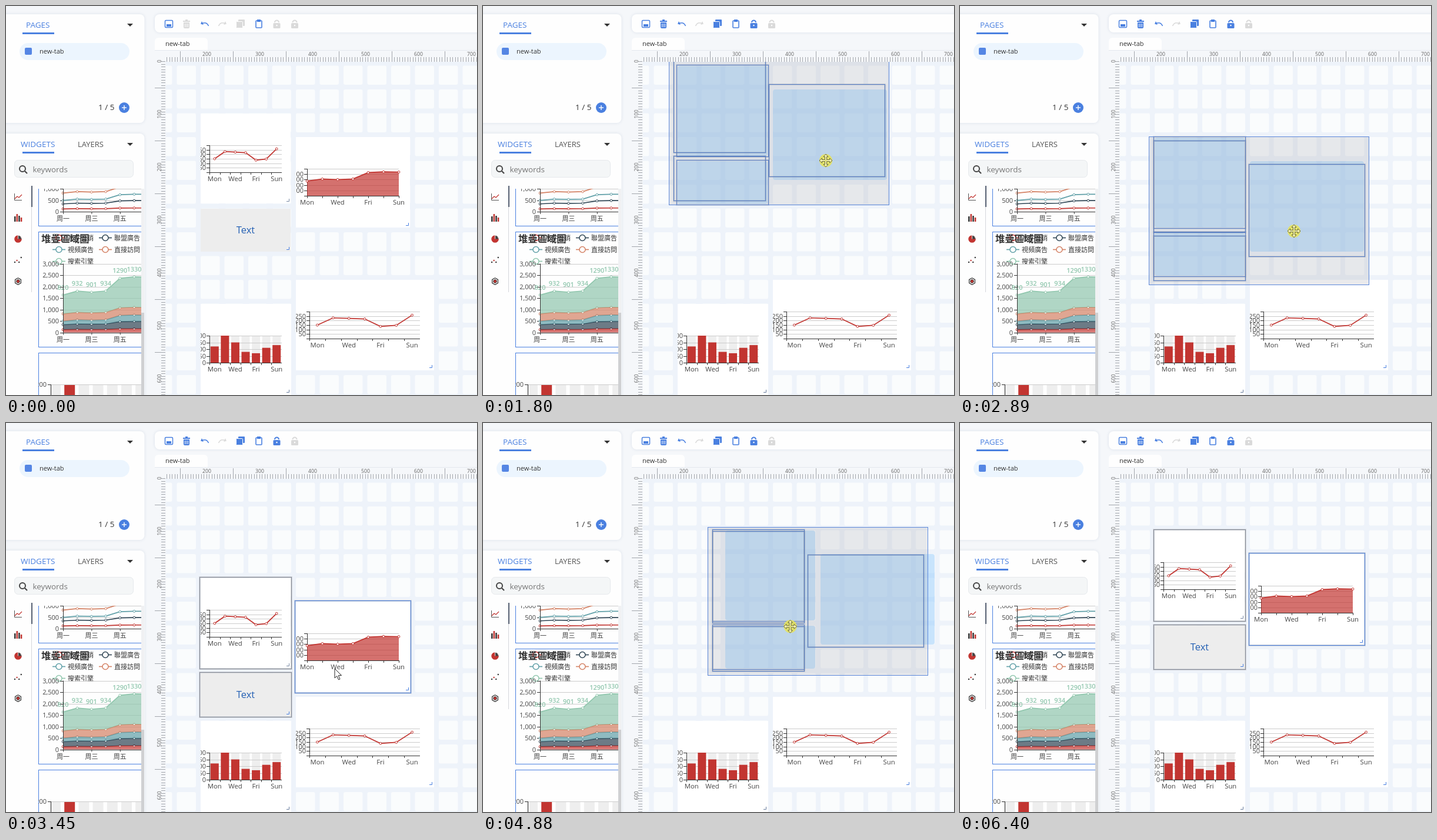
These frames come from a looping animation (801x662 px, 6860 ms). An HTML page with a canvas:

```html
<!DOCTYPE html>
<html lang="zh-Hant">
<head>
<meta charset="utf-8">
<title>Dashboard editor</title>
<style>
html, body { margin: 0; width: 100%; height: 100%; overflow: hidden; background: #f5f7fa; }
canvas { display: block; }
</style>
</head>
<body>
<canvas id="stage" width="801" height="662"></canvas>
<script>
const c = document.getElementById('stage').getContext('2d');
const LOOP = 6860, CELL = 40.5;
const BLUE = '#4a80e0', OFF = '#dadada', INK = '#333', RED = '#c23531', PAGE = '#f5f7fa';
const FONT = '"Open Sans","Noto Sans CJK TC","Noto Sans CJK SC","Noto Sans CJK JP",sans-serif';
const PALETTE = [RED, '#2f4554', '#61a0a8', '#d48265', '#91c7ae'];
const DAYS = ['Mon', 'Tue', 'Wed', 'Thu', 'Fri', 'Sat', 'Sun'];
const LINE = [150, 230, 224, 218, 135, 147, 260];
const BARS = [120, 200, 150, 80, 70, 110, 130];
const AREA = [820, 932, 901, 934, 1290, 1330, 1320];
// Stacked series follow the area data, each from its own level with its own gain
const SERIES = [[120, .08], [220, .2], [150, .25], [320, .03], [820, 1]]
  .map(([level, gain]) => AREA.map(v => level + (v - 820) * gain));

// Widgets that get selected: line chart, area chart, text
const GROUP = [[331, 183, 153, 153], [493, 223, 194, 154], [331, 345, 153, 73]];

// Pointer moves that carry the group, and free ones: [start, duration, dx, dy]
const CARRY = [
  [1500, 300, -5, -88], [2310, 160, -2, 132], [2690, 200, 7, 4], [2890, 260, 0, 47],
  [3650, 290, -10, -98], [4150, 420, 91, 7], [4820, 230, -118, -4], [5420, 400, 37, 0]
];
const GLIDE = [
  [130, 350, -390, -471], [480, 280, 306, 256], [1380, 120, -48, -38], [2480, 200, -20, -16],
  [3250, 140, -13, -18], [3390, 60, 4, 6], [3980, 90, -8, 8], [4080, 70, -89, 12],
  [5090, 70, 25, 5], [5850, 210, 182, 46], [6060, 340, 132, 271]
];
const DRAGS = [[1500, 3250], [3650, 4000], [4150, 5060], [5420, 5850]];

const ease = p => { p = Math.min(1, Math.max(0, p)); return p * p * (3 - 2 * p); };
const travel = (moves, t) => moves.reduce(([x, y], [start, time, dx, dy]) => {
  const p = ease((t - start) / time);
  return [x + dx * p, y + dy * p];
}, [0, 0]);
const snap = v => v.map(n => Math.round(n / CELL) * CELL);
const shift = ([x, y, w, h], [dx, dy]) => [Math.round(x + dx), Math.round(y + dy), w, h];

function text(s, x, y, size, color = INK, align = 'left', weight = 400) {
  c.font = `${weight} ${size}px ${FONT}`;
  c.textAlign = align;
  c.fillStyle = color;
  c.fillText(s, x, y);
}
function rect(x, y, w, h, color) {
  c.fillStyle = color;
  c.fillRect(x, y, w, h);
}
function paint(fill, stroke, width = 1) {
  if (fill) { c.fillStyle = fill; c.fill(); }
  if (stroke) { c.strokeStyle = stroke; c.lineWidth = width; c.stroke(); }
}
function round(x, y, w, h, r, fill, stroke, width) {
  c.beginPath();
  c.roundRect(x, y, w, h, r);
  paint(fill, stroke, width);
}
function path(points, stroke, width, fill) {
  c.beginPath();
  points.forEach(p => c.lineTo(...p));
  paint(fill, stroke, width);
}
function circle(x, y, r, fill, stroke, width) {
  c.beginPath();
  c.arc(x, y, r, 0, 7);
  paint(fill, stroke, width);
}
function frameRect(x, y, w, h, color, width = 1) {
  c.strokeStyle = color;
  c.lineWidth = width;
  c.strokeRect(x, y, w, h);
}
function clipped(box, draw) {
  c.save();
  c.beginPath();
  c.rect(...box);
  c.clip();
  draw();
  c.restore();
}
function panel(x, y, w, h) {
  c.save();
  c.shadowColor = 'rgba(90,110,150,.16)';
  c.shadowBlur = 5;
  round(x, y, w, h, 8, '#fefefe');
  c.restore();
}
function polyline(points, color) {
  path(points, color, 1.7);
  points.forEach(p => circle(...p, 1.9, '#fff', color));
}
function gridLine(left, right, y, value) {
  y = Math.round(y) + .5;
  path([[left, y], [right, y]], value ? '#ccc' : INK);
  path([[left - 5, y], [left, y]], INK);
}

// Small stage chart, 46px high, hanging from `top`
function chart(left, right, top, values, max, step, kind) {
  const bottom = top + 46, bars = kind === 'bar', area = kind === 'area';
  const pitch = (right - left) / (area ? 6 : 7);
  const px = i => left + pitch * (i + (area ? 0 : .5));
  const py = v => bottom - v / max * 46;
  const points = values.map((v, i) => [px(i), py(v)]);
  if (bars) points.forEach(([x]) => rect(x - 7, top, 14, 46, '#eee'));
  for (let v = 0; v <= max; v += step) {
    gridLine(left, right, py(v), v);
    if (bars || v && v < max) text(v.toLocaleString(), left - 6, py(v) + 4, 11, '#444', 'right');
  }
  path([[left + .5, top], [left + .5, bottom]], INK);
  if (bars) points.forEach(([x, y]) => rect(x - 7, y, 14, bottom - y, RED));
  if (area) path([[left, bottom], ...points, [right, bottom]], null, 1, 'rgba(194,53,49,.7)');
  if (!bars) polyline(points, RED);
  DAYS.forEach((day, i) => {
    const x = Math.round(left + pitch * i) + .5;
    path([[x, bottom], [x, bottom + 4]], INK);
    if (i % 2 === 0) text(day, px(i), bottom + 15, 11.3, '#444', 'center');
  });
}
function corner(x, y, color = BLUE) {
  path([[x - .5, y - 5], [x - .5, y - .5], [x - 5, y - .5]], color);
}

function stackedChart(zero, max, area) {
  const y = v => zero - v * .039, x = i => 97 + 24.2 * i;
  for (let v = 0; v <= max; v += 500) {
    gridLine(97, 240, y(v), v);
    text(v.toLocaleString(), 90, y(v) + 4, 11, '#444', 'right');
  }
  let base = Array(7).fill(0);
  SERIES.forEach((series, n) => {
    const top = series.map((v, i) => v + base[i]);
    const points = top.map((v, i) => [x(i), y(v)]);
    if (area) {
      c.globalAlpha = .7;
      path([...points, ...base.map((v, i) => [x(i), y(v)]).reverse()], null, 1, PALETTE[n]);
      c.globalAlpha = 1;
    }
    polyline(points, PALETTE[n]);
    if (area && n === 4) points.forEach((p, i) => text(AREA[i], p[0], p[1] - 9, 11, PALETTE[4], 'center', 600));
    base = top;
  });
  path([[97.5, y(max)], [97.5, zero]], INK);
  ['周一', '周三', '周五'].forEach((day, i) => {
    path([[x(i * 2) + .5, zero], [x(i * 2) + .5, zero + 4]], INK);
    text(day, x(i * 2), zero + 16, 11, '#444', 'center');
  });
}

function widgetList() {
  clipped([55, 311, 175, 351], () => {
    [[290, 84], [384, 196], [590, 100]].forEach(([y, h]) => frameRect(55.5, y + .5, 200, h, BLUE));
    stackedChart(350, 1500, false);
    ['郵件營銷', '聯盟廣告', '視頻廣告', '直接訪問', '搜索引擎'].forEach((name, i) => {
      const x = 90 + 79 * (i % 2), y = 394.5 + 20 * Math.floor(i / 2);
      path([[x - 11, y], [x + 11, y]], PALETTE[i], 1.6);
      circle(x, y, 5, '#fff', PALETTE[i], 1.5);
      text(name, x + 15, y + 4, 11);
    });
    text('堆疊區域圖', 60, 402, 16.3, INK, 'left', 700);
    stackedChart(555.5, 3000, true);
    text('200', 69, 648, 11, '#444', 'right');
    for (let i = 0; i < 7; i++) rect(75 + 24.2 * i, 645, 18, 20, i === 1 ? RED : '#eee');
    gridLine(76, 231, 644, 200);
    path([[76.5, 644], [76.5, 662]], INK);
  });
  rect(230, 311, 5, 351, '#f0f1f3');
  rect(230, 522, 5, 140, '#cfd0d2');
}

function widgetIcons() {
  path([[14.5, 319], [14.5, 330.5], [27, 330.5]], '#555');
  path([[15, 328], [19, 324], [22, 326], [27, 321]], RED, 1.2);
  [9, 13, 10, 7].forEach((h, i) => rect(14 + 3.6 * i, 367 - h, 2.5, h, i % 2 ? RED : INK));
  circle(20.5, 396.5, 6.3, RED);
  path([[20.5, 396.5], [20.5, 390], [24.5, 391.5], [27, 396.5]], '#fff', .8, '#444');
  [4, 1, 4, -4].forEach((dy, i) => circle(15 + 3.6 * i, 432 + dy, 1.2, i === 1 ? RED : INK));
  const hexagon = r => Array.from({length: 7}, (_, i) =>
    [20.5 + r * Math.sin(i * Math.PI / 3), 468.5 - r * Math.cos(i * Math.PI / 3)]);
  path(hexagon(5.7), '#333', 1.2);
  path(hexagon(3), '#333', 1, RED);
}

function sidebar() {
  panel(-10, 14, 245.5, 185);
  text('PAGES', 34, 37, 13.5, BLUE);
  round(23, 63, 187, 29, 14.5, '#ecf5fe');
  round(32, 71, 12, 12, 2, '#5586e4');
  text('new-tab', 57, 81, 11);
  text('1 / 5', 157, 177, 13.5);
  circle(201, 173, 9, BLUE);
  path([[197, 173], [205, 173]], '#fff', 1.4);
  path([[201, 169], [201, 177]], '#fff', 1.4);

  panel(-10, 217, 245.5, 470);
  text('WIDGETS', 25, 240, 13.5, BLUE);
  text('LAYERS', 122, 240, 13, '#555');
  [32, 235].forEach(y => {
    rect(28, y + 13, 54, 3, BLUE);
    path([[206, y - 2], [216, y - 2], [211, y + 3]], null, 1, INK);
  });
  round(14.5, 262.5, 202, 29, 6, '#f4f6f7', '#e6e9ec');
  circle(28, 277, 5, null, '#444', 2);
  path([[32, 281], [36, 285]], '#444', 2.2);
  text('keywords', 45.5, 283, 13.5, '#777');
  widgetIcons();
  rect(43, 306, 1, 181, '#d4d7dc');
  rect(43, 306, 2, 36, '#566072');
  widgetList();
}

function lock(x, color) {
  round(x - 6, 29, 12, 9, 1.5, color);
  c.beginPath();
  c.arc(x, 28, 3.5, Math.PI, 0);
  paint(null, color, 2);
  circle(x, 33, 1.2, '#fff');
}
function turnArrow(x, dir, color) {
  c.beginPath();
  c.moveTo(x - 5 * dir, 30);
  c.quadraticCurveTo(x + 3 * dir, 26, x + 6.5 * dir, 34);
  paint(null, color, 1.5);
  path([[x - 7 * dir, 30.5], [x - 5 * dir, 26], [x - 2 * dir, 32]], null, 1, color);
}
function toolbar(active) {
  const on = active ? BLUE : OFF;
  panel(253, 14, 560, 31);
  round(270.5, 24.5, 13, 12, 1.5, null, BLUE, 1.5);
  rect(273, 31, 8, 4, BLUE);
  rect(301, 25, 12, 2, on);
  rect(305, 23, 4, 2, on);
  round(302, 28, 10, 10, [0, 0, 2, 2], on);
  [304.5, 307, 309.5].forEach(x => path([[x, 30], [x, 36]], '#fff', .9));
  turnArrow(338, 1, BLUE);
  turnArrow(368, -1, OFF);
  round(395, 23, 11, 11, 1, on);
  round(391.5, 26.5, 11, 11, 1, on, '#fff');
  round(425, 25, 10, 12, 1, null, BLUE, 1.6);
  rect(427, 23, 6, 4, BLUE);
  lock(460.5, on);
  lock(491, OFF);
}

function board() {
  rect(272, 95, 529, 567, '#eef3fa');
  clipped([272, 95, 529, 567], () => {
    for (let x = 250; x < 801; x += CELL)
      for (let y = 101.5; y < 662; y += CELL) round(x, y, 32.5, 32.5, 3, '#fafcfd');
  });
  round(253, 54, 90, 23, [6, 6, 0, 0], '#fefefe');
  text('new-tab', 271, 68, 11);
  rect(253, 76, 548, 19, PAGE);
  rect(253, 76, 19, 586, PAGE);
  path([[253, 75.5], [801, 75.5]], '#e4e8ee');
  for (let i = 0; i < 127; i++) {
    const x = Math.round(274 + i * 4.5) - .5, y = Math.round(94 + i * 4.5) + .5;
    path([[x, i % 20 === 5 ? 77 : 87], [x, 95]], '#a3a7ad');
    path([[i % 20 === 10 ? 253 : 264, y], [271, y]], '#a3a7ad');
  }
  for (let n = 0; n < 8; n++) {
    if (n > 1) text(n * 100, 161.5 + n * 90, 85, 8.7, '#666', 'center');
    c.save();
    c.translate(264, 94 + n * 90);
    c.rotate(-Math.PI / 2);
    text(n * 100, 0, 0, 8.7, '#666', 'center');
    c.restore();
  }
}

function fixedWidgets() {
  clipped([331, 507, 154, 155], () => {
    rect(331, 507, 154, 155, '#fff');
    chart(346, 469, 561, BARS, 200, 50, 'bar');
    corner(482, 658, '#6a7f9f');
  });
  clipped([493, 466, 235, 154], () => {
    rect(493, 466, 235, 154, '#fff');
    chart(516, 704, 520, LINE, 300, 50, 'line');
    corner(725, 616);
  });
}

function outline([x, y, w, h], color) {
  const box = [x - 1.5, y - 1.5, w + 3, h + 3];
  frameRect(...box, 'rgba(110,110,115,.22)', 3);
  frameRect(...box, color);
}
function restingGroup(offset, selected) {
  c.save();
  c.translate(...offset.map(Math.round));
  GROUP.forEach((box, i) => {
    const [x, y, w, h] = box;
    if (selected) outline(box, i === 1 ? BLUE : '#868b96');
    clipped(box, () => {
      rect(...box, i === 2 ? '#ededed' : '#fff');
      if (i === 0) chart(346, 469, 237, LINE, 300, 50, 'line');
      if (i === 1) chart(512, 668, 277, AREA, 1500, 300, 'area');
      if (i === 2) text('Text', 407.5, 387, 16.5, '#2460b4', 'center');
    });
    corner(x + w - 2, y + h - 3, i ? BLUE : '#7b8ba6');
  });
  c.restore();
}

function groupBox(x, y, w, h) {
  rect(x, y, w, h, 'rgba(150,148,158,.2)');
  frameRect(Math.round(x) + .5, Math.round(y) + .5, w, h, '#5c88da');
}
// Placeholders trail the pointer on the grid; the grabbed chart has no outline of its own
function draggedGroup(t) {
  const raw = travel(CARRY, t), now = snap(raw), late = snap(travel(CARRY, t - 90));
  const settling = now.map((v, i) => (v + late[i]) / 2);
  clipped([272, 95, 529, 567], () => {
    GROUP.forEach(box => round(...shift(box, late), 4, 'rgba(140,198,250,.46)'));
    [GROUP[0], GROUP[2]].forEach(box => outline(shift(box, settling), BLUE));
    groupBox(321 + raw[0], 174 + raw[1], 374, 252);
    GROUP.forEach(box => outline(shift(box, raw), '#5680cc'));
  });
}

function arrowCursor(x, y) {
  const shape = [[0, 0], [0, 16], [3.8, 12.6], [6.5, 18.8], [9, 17.8], [6.3, 11.7], [11.5, 11.5], [0, 0]];
  path(shape.map(p => [x + p[0], y + p[1]]), '#222', 1, '#fff');
}
function moveCursor(x, y) {
  circle(x, y, 11, 'rgba(232,228,85,.85)');
  const arm = [[1.5, -1.5], [1.5, -6.5], [4, -6.5], [0, -11], [-4, -6.5], [-1.5, -6.5], [-1.5, -1.5]];
  c.save();
  c.translate(x, y);
  for (let i = 0; i < 4; i++) {
    path(arm, '#6a6a3a', 1, '#f3f1b0');
    c.rotate(Math.PI / 2);
  }
  c.restore();
}

function draw(t) {
  const selected = t >= 830;
  const dragging = DRAGS.some(([start, end]) => t >= start && t < end);
  rect(0, 0, 801, 662, PAGE);
  board();
  toolbar(selected);
  sidebar();
  fixedWidgets();
  if (dragging) draggedGroup(t);
  else restingGroup(snap(travel(CARRY, t)), selected);

  const [x, y] = travel([...CARRY, ...GLIDE], t).map((v, i) => v + [720, 604][i]);
  if (t >= 480 && t < 830) groupBox(329, 133, x - 329, y - 133);
  if (t >= 130 && t < 6400) (dragging ? moveCursor : arrowCursor)(x, y);
}

function frame() {
  draw(performance.now() % LOOP);
  requestAnimationFrame(frame);
}
frame();
</script>
</body>
</html>
```
